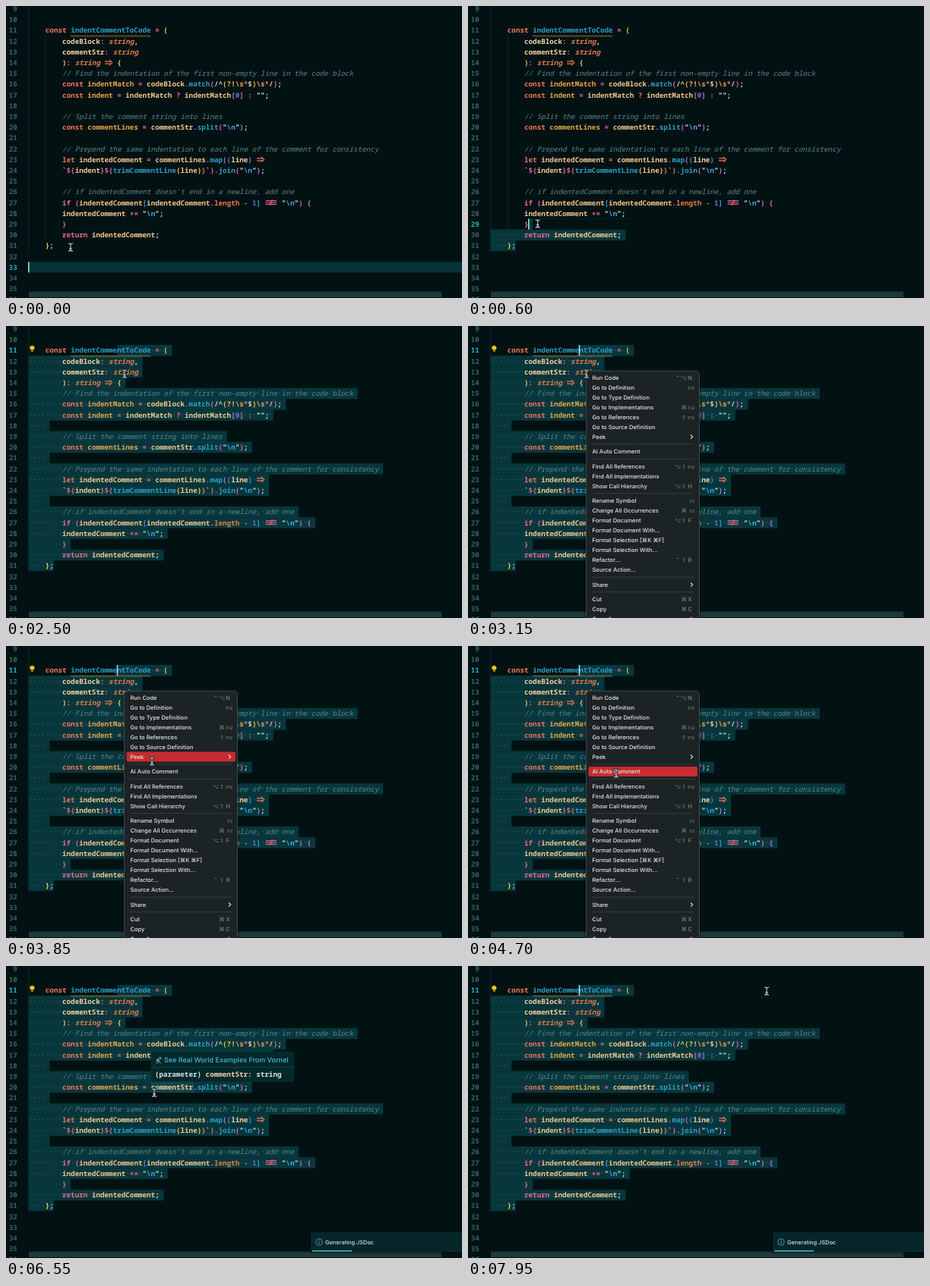
These frames come from a looping animation (600x385 px, 8000 ms). An HTML page:

```html
<!DOCTYPE html>
<html lang="en">
<head>
<meta charset="utf-8">
<title>Editor</title>
<style>
html, body { margin: 0; width: 100%; height: 100%; overflow: hidden; background: #021213; }
svg { display: block; width: 600px; height: 385px; }
text { text-rendering: geometricPrecision; }
.mono { font: 600 9.25px "Noto Sans Mono", "DejaVu Sans Mono", monospace; }
.ui { font: 500 7.5px Inter, "Open Sans", sans-serif; }
.key { font: 7.5px "DejaVu Sans", sans-serif; }
</style>
</head>
<body>
<svg id="stage" viewBox="0 0 600 385">
  <defs><clipPath id="picked"><path id="range"/></clipPath></defs>
  <rect width="600" height="385" fill="#021213"/>
  <rect id="lineMark" x="30" width="570" height="14" fill="#063338"/>
  <g id="selection" clip-path="url(#picked)"></g>
  <rect id="word" x="191" y="152.6" width="56" height="14" fill="#12474d"/>
  <path d="M29.8 0V323M52 39V309" stroke="#133235" stroke-width=".8"/>
  <path id="scope" d="M74.3 67V39.3H213" fill="none" stroke="#c3a140" stroke-width=".9"/>
  <path id="squiggle" fill="none" stroke="#d98a32" stroke-width=".9"/>
  <g id="code" class="mono"></g>
  <rect id="caret" width="1.5" height="14" fill="#9feaf0"/>
  <g id="bulb">
    <path d="M32.8 31.6C29.4 28.2 32.2 26 34.4 26S39.4 28.2 36 31.6Z" fill="#ffc817"/>
    <rect x="33" y="32" width="2.8" height="1.8" rx=".6" fill="#d9a514"/>
  </g>
  <rect x="30" y="376.6" width="543" height="7.4" fill="#1e393a"/>
  <g id="tip">
    <rect x="191" y="113.5" width="187.5" height="39" rx="1.5" fill="#04282b" stroke="#0a3236" stroke-width=".8"/>
    <path d="M191 133.5H378.5" stroke="#174348" stroke-width=".8"/>
    <path d="M197.5 124.5l5.5-4.5 1.2 2-6.2 3.4zM200.5 124.5l-2 4.5M200.8 124.5l2.4 4" fill="none" stroke="#9fc3c6" stroke-width=".9"/>
    <text x="208" y="127.4" class="ui" style="font-size:9px" fill="#42bde4">See Real World Examples From Vornel</text>
    <text x="196" y="146.4" class="mono" fill="#d6e6e2">(parameter) <tspan fill="#f6d3a0">commentStr</tspan>: string</text>
  </g>
  <g id="toast">
    <rect x="399" y="349" width="204" height="30" rx="3" fill="#000" opacity=".3"/>
    <rect x="401" y="351" width="200" height="26" rx="1.5" fill="#07262a"/>
    <circle cx="412" cy="364" r="4.1" fill="none" stroke="#3aa6d8" stroke-width=".9"/>
    <path d="M412 363.3V366.4M412 361.3V362.3" stroke="#3aa6d8"/>
    <text x="420" y="366.8" class="ui" style="font-size:7.4px" fill="#d5e3e3">Generating JSDoc</text>
    <rect x="403" y="375" width="52" height="1.4" fill="#45c4cf"/>
  </g>
  <g id="menu">
    <rect x="153.5" y="59" width="153" height="340" rx="7" fill="#000" opacity=".3"/>
    <rect x="155.5" y="59.3" width="149" height="340" rx="5" fill="#1c2325" stroke="#4b5557" stroke-width=".8"/>
    <rect id="hot" x="158.5" width="143.5" height="13" rx="2.5" fill="#c72c30"/>
  </g>
  <g id="mouse" fill="none" stroke-linecap="round"></g>
</svg>
<script>
const $ = id => document.getElementById(id);
const LOOP = 8000, LEFT = 29.6, CW = 5.553, PITCH = 14.2, FIRST = 11, LAST = 31;
const colX = c => LEFT + c * CW;
const rowY = n => 32 + (n - FIRST) * PITCH;
const rowTop = n => rowY(n) - 7;

function add(parent, tag, attrs, text) {
  const el = document.createElementNS('http://www.w3.org/2000/svg', tag);
  for (const k in attrs) el.setAttribute(k, attrs[k]);
  if (text) el.textContent = text;
  parent.append(el);
  return el;
}

const lines = String.raw`    const indentCommentToCode = (
        codeBlock: string,
        commentStr: string
        ): string => {
        // Find the indentation of the first non-empty line in the code block
        const indentMatch = codeBlock.match(/^(?!\s*$)\s*/);
        const indent = indentMatch ? indentMatch[0] : "";
    
        // Split the comment string into lines
        const commentLines = commentStr.split("\n");
    
        // Prepend the same indentation to each line of the comment for consistency
        let indentedComment = commentLines.map((line) =>
        ~$~{indent}$~{trimCommentLine(line)}~).join("\n");
    
        // if indentedComment doesn't end in a newline, add one
        if (indentedComment[indentedComment.length - 1] !== "\n") {
        indentedComment += "\n";
        }
        return indentedComment;
    };`.replace(/\$~\{/g, '${').replace(/~/g, '\x60').split('\n');

// Syntax rules in order of priority: pattern, colour, extra style
const CORAL = '#f0755c', PINK = '#ee6a94', BLUE = '#2d9fc6', PEACH = '#f5c68c';
const rules = [
  [/\/\/.*/y, '#5b868c', 'font-style:italic;font-weight:500'],
  [/=>|!==/y, CORAL, 'glyph'],
  [/\\n/y, '#3ba7ee'],
  [/\\s/y, '#f2a04a'],
  [/\(\?!|\$\{|[(\[{]/y, 'open'],
  [/[)\]}]/y, 'close'],
  [/(const|let)\b/y, CORAL],
  [/(return|if)\b/y, PINK],
  [/string\b/y, '#e5774c', 'font-style:italic'],
  [/length\b/y, '#e8794a'],
  [/(codeBlock|commentStr)(?=:)|line(?=\) =)/y, '#f8d0a0', 'font-weight:800'],
  [/indentCommentToCode|\w+(?=\()/y, BLUE],
  [/(?<=const )\w+/y, '#e9a54b'],
  [/\d/y, '#5c74dc'],
  [/\w+/y, PEACH],
  [/[=+\-?:*.]+/y, PINK],
  [/[",;]+/y, '#cfe6e2'],
  [/[^\s\w]/y, '#e3d3a0']
];
const bracketColors = ['#f7cf46', '#d66cc4', '#3a97e8'];
const openers = [];

function bracket(kind, s) {
  if (kind === 'close') return openers.pop();
  const color = s === '${' ? '#d66c9c' : s === '(?!' ? '#f2c04a' : bracketColors[openers.length % 3];
  openers.push(color);
  return color;
}

function ligature(s, x, y) {
  const arrow = s === '=>';
  const d = arrow
    ? `M${x + .6} ${y - 1.5}h8M${x + .6} ${y + 1.5}h8M${x + 6.6} ${y - 3.4}l3.6 3.4l-3.6 3.4`
    : `M${x + 1} ${y - 2.3}h14.5M${x + 1} ${y}h14.5M${x + 1} ${y + 2.3}h14.5M${x + 6.6} ${y + 3.6}l3.4-7.2`;
  add($('code'), 'path', { d, fill: 'none', stroke: arrow ? CORAL : PINK, 'stroke-width': 1.1 });
}

function drawLine(src, n) {
  const y = rowY(n);
  for (let c = 0; c < src.length;) {
    let size = 1;
    for (const [re, color, style = ''] of rules) {
      re.lastIndex = c;
      const m = re.exec(src);
      if (!m) continue;
      const s = m[0];
      size = s.length;
      if (style === 'glyph') ligature(s, colX(c), y);
      else add($('code'), 'text', {
        x: colX(c), y: y + 3.3, style,
        fill: color === 'open' || color === 'close' ? bracket(color, s) : color
      }, s);
      break;
    }
    c += size;
  }
  // A selected line break takes one more column
  const cols = src.length + (n < LAST);
  add($('selection'), 'rect', { x: LEFT, y: rowTop(n), width: cols * CW, height: PITCH + .2, fill: '#07373c' });
}

function drawDots(src, n) {
  [...src].forEach((ch, c) => {
    if (ch === ' ') add($('selection'), 'circle', { cx: colX(c + .5), cy: rowY(n), r: .65, fill: '#3d686c' });
  });
}

lines.forEach((s, i) => drawLine(s, FIRST + i));
lines.forEach((s, i) => drawDots(s, FIRST + i));

const numbers = {};
for (let n = 9; n <= 36; n++) {
  numbers[n] = add($('code'), 'text', { x: 14.8, y: rowY(n) + 3.3, 'text-anchor': 'end' }, String(n));
}

let wave = 'M85 39.6';
for (let i = 0; i < 35; i++) wave += 'q.75-1.6 1.5 0t1.5 0';
$('squiggle').setAttribute('d', wave);

// Context menu: label|modifiers|key, empty entries are separators
const entries = `Run Code|⌃⌥|N
Go to Definition||F12
Go to Type Definition
Go to Implementations|⌘|F12
Go to References|⇧|F12
Go to Source Definition
Peek|>

AI Auto Comment

Find All References|⌥⇧|F12
Find All Implementations
Show Call Hierarchy|⌥⇧|H

Rename Symbol||F2
Change All Occurrences|⌘|F2
Format Document|⌥⇧|F
Format Document With...
Format Selection [⌘K ⌘F]
Format Selection With...
Refactor...|⌃⇧|R
Source Action...

Share|>

Cut|⌘|X
Copy|⌘|C
Copy As|>`.split('\n');
const itemYs = [];
let menuY = 68;
for (const entry of entries) {
  const menu = $('menu');
  if (!entry) {
    add(menu, 'path', { d: `M163 ${menuY - 3.3}H297`, stroke: '#3b4446', 'stroke-width': .8 });
    menuY += 6.5;
    continue;
  }
  const [label, mods = '', key = ''] = entry.split('|');
  add(menu, 'text', { x: 163.5, y: menuY + 2.7, class: 'ui', fill: '#e6eaea' }, label);
  if (mods === '>') {
    add(menu, 'path', { d: `M293 ${menuY - 2.6}l2.6 2.6l-2.6 2.6`, fill: 'none', stroke: '#dde2e2', 'stroke-width': 1.1 });
  } else {
    [...mods].reverse().forEach((m, i) => add(menu, 'text', {
      x: 284 - i * 8, y: menuY + 2.7, class: 'key', 'text-anchor': 'middle', fill: '#7d8687'
    }, m));
    const long = key.length > 1;
    add(menu, 'text', {
      x: long ? 298 : 292, y: menuY + 2.5, class: 'ui', fill: '#7d8687',
      'text-anchor': long ? 'end' : 'middle', style: long ? 'font-size:5.4px' : ''
    }, key);
  }
  itemYs.push(menuY);
  menuY += 13;
}

const beam = 'M-2.6-5Q0-5 0-3V3Q0 5-2.6 5M2.6-5Q0-5 0-3M0 3Q0 5 2.6 5M-1.5 1.8H1.5';
add($('mouse'), 'path', { d: beam, stroke: '#0a1011', 'stroke-width': 2.6 });
add($('mouse'), 'path', { d: beam, stroke: '#cdd3d1', 'stroke-width': 1.1 });

// Mouse path: time, x, y
const path = [
  [0, 85, 318], [400, 85, 318], [1350, 143, 49], [1600, 148, 33], [2000, 149, 31],
  [2400, 156, 63], [3200, 156, 63], [3850, 192, 152], [4300, 192, 152], [4700, 195, 168],
  [6850, 195, 167], [7600, 393, 33], [LOOP, 393, 33]
];
const ramp = (t, a, b) => Math.min(1, Math.max(0, (t - a) / (b - a)));
const smooth = u => u * u * (3 - 2 * u);

function mouseAt(t) {
  const i = path.findIndex((p, k) => k && t <= p[0]);
  const [a, b] = [path[i - 1], path[i]];
  const u = smooth(ramp(t, a[0], b[0]));
  return [a[1] + (b[1] - a[1]) * u, a[2] + (b[2] - a[2]) * u];
}

function caretAt(t) {
  if (t < 400) return [33, 0];
  const [x, y] = mouseAt(Math.min(t, 1600));
  const row = Math.min(LAST, Math.max(FIRST, Math.round((y - 32) / PITCH) + FIRST));
  return [row, Math.min(lines[row - FIRST].length, Math.round((x - LEFT) / CW))];
}

const show = (id, on) => $(id).style.display = on ? '' : 'none';

function render(t) {
  const [mx, my] = mouseAt(t);
  const [row, col] = caretAt(t);
  const x = colX(col), top = rowTop(row);
  const selected = row < LAST;

  $('mouse').setAttribute('transform', `translate(${mx} ${my})`);
  $('caret').setAttribute('x', x - .5);
  $('caret').setAttribute('y', top);
  show('caret', t < 1600 || (t + 300) % 1000 < 500);
  show('lineMark', !selected);
  $('lineMark').setAttribute('y', top);
  show('selection', selected);
  $('range').setAttribute('d', `M${x} ${top}H600V${top + PITCH}H${x}ZM0 ${top + PITCH}H600V${rowTop(LAST + 1)}H0Z`);
  show('scope', row === 12 || row === 13);
  for (const n in numbers) numbers[n].setAttribute('fill', +n === row ? '#2aa9c4' : '#40605f');

  show('bulb', t >= 1900);
  show('menu', t >= 2950 && t < 5620);
  $('menu').setAttribute('opacity', 1 - ramp(t, 5380, 5620));
  const hot = itemYs.find(y => Math.abs(my - y) <= 6.5);
  show('hot', hot && mx > 158);
  if (hot) $('hot').setAttribute('y', hot - 6.5);

  const hover = t >= 6250 && t < 7050;
  show('tip', hover);
  show('word', hover);
  const rise = smooth(ramp(t, 5650, 5900));
  show('toast', rise > 0);
  $('toast').setAttribute('opacity', rise);
  $('toast').setAttribute('transform', `translate(0 ${(1 - rise) * 30})`);
}

const start = performance.now();
function tick() {
  render((performance.now() - start) % LOOP);
  requestAnimationFrame(tick);
}
render(0);
requestAnimationFrame(tick);
</script>
</body>
</html>
```
